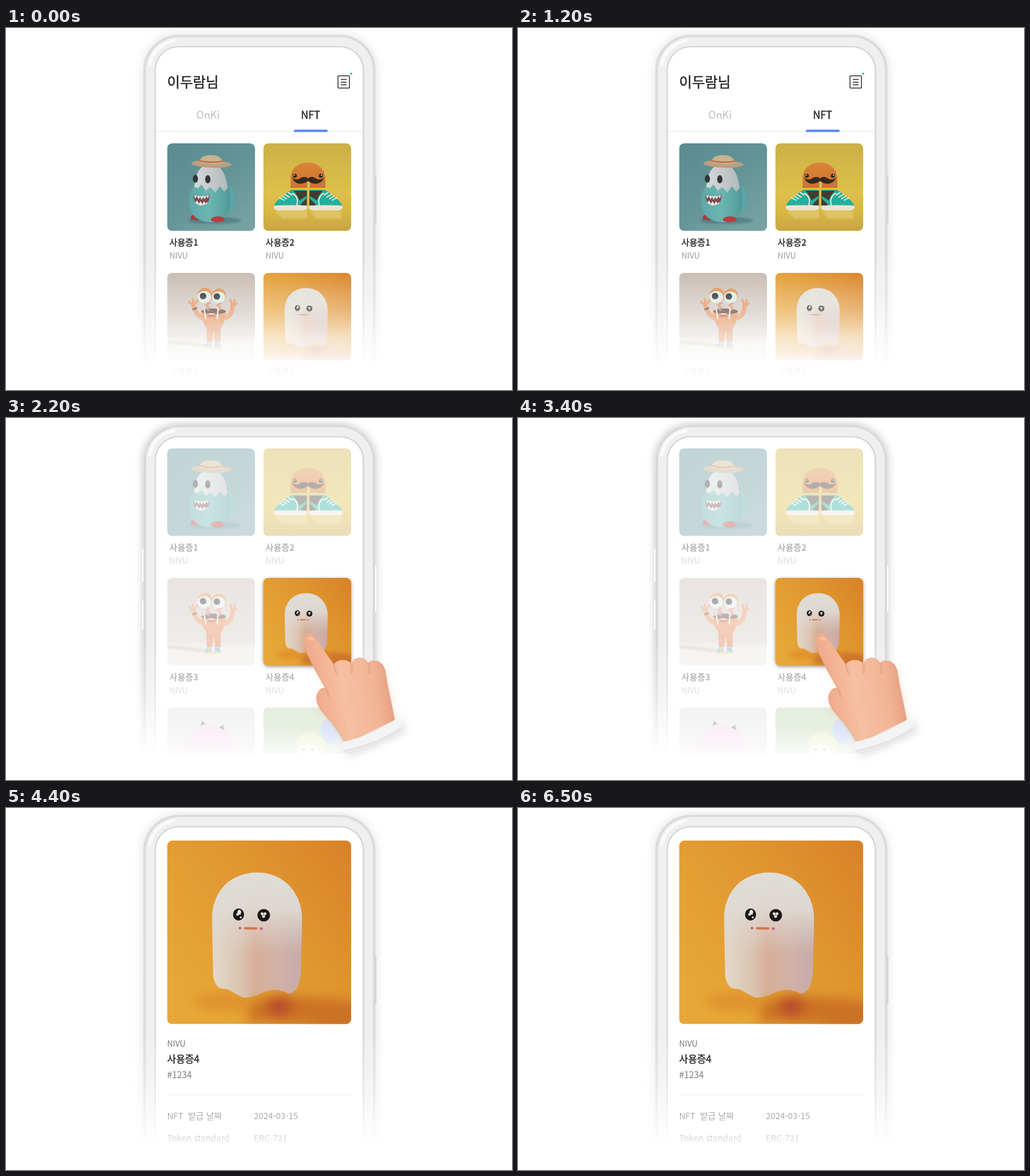
Recreate the animation shown at these times as an HTML page. Size 884 px wide and 634 px high, loop 7.9 s.

```html
<!DOCTYPE html>
<html lang="ko">
<head>
<meta charset="utf-8">
<title>NFT wallet</title>
<style>
  html, body { margin: 0; width: 100%; height: 100%; overflow: hidden; background: #fff; }
  svg { display: block; width: 100%; height: 100%; }
  text { font-family: "Noto Sans CJK KR", "Noto Sans KR", "Noto Sans CJK JP", "Noto Sans", sans-serif; white-space: pre; }
  .strong { fill: #222; stroke: #222; stroke-width: .4px; }
  .name { font-size: 15.1px; }
  .org { font-size: 14px; fill: #999; }
  .row { font-size: 15px; fill: #888; }
  .card { clip-path: url(#round); }
  .home { animation: home 7.9s step-end infinite; }
  .detail { opacity: 0; animation: detail 7.9s step-end infinite; }
  @keyframes home { 0% { opacity: 1 } 25.316% { opacity: .55 } 27.848% { opacity: 0 } 100% { opacity: 0 } }
  @keyframes detail { 0% { opacity: 0 } 53.164% { opacity: .5 } 55.696% { opacity: 1 } 100% { opacity: 1 } }
</style>
</head>
<body>
<svg viewBox="0 0 884 634" preserveAspectRatio="none">
<defs>
  <clipPath id="round"><rect width="100" height="100" rx="5.8"/></clipPath>
  <clipPath id="roundBig"><rect width="100" height="100" rx="2.8"/></clipPath>
  <clipPath id="fold"><rect width="884" height="588"/></clipPath>
  <filter id="halo" x="-20%" y="-20%" width="140%" height="140%"><feGaussianBlur stdDeviation="9"/></filter>
  <filter id="soft" x="-50%" y="-50%" width="200%" height="200%"><feGaussianBlur stdDeviation="3"/></filter>
  <filter id="fine" x="-50%" y="-50%" width="200%" height="200%"><feGaussianBlur stdDeviation="1.2"/></filter>

  <linearGradient id="fadeFrame" gradientUnits="userSpaceOnUse" x1="0" y1="390" x2="0" y2="590">
    <stop stop-color="#fff" stop-opacity="0"/><stop offset=".5" stop-color="#fff" stop-opacity=".4"/><stop offset="1" stop-color="#fff"/>
  </linearGradient>
  <linearGradient id="fadeHome" gradientUnits="userSpaceOnUse" x1="0" y1="420" x2="0" y2="610">
    <stop stop-color="#fff" stop-opacity="0"/><stop offset=".42" stop-color="#fff" stop-opacity=".4"/>
    <stop offset=".63" stop-color="#fff" stop-opacity=".7"/><stop offset=".84" stop-color="#fff" stop-opacity=".9"/><stop offset="1" stop-color="#fff"/>
  </linearGradient>
  <linearGradient id="fadeDetail" gradientUnits="userSpaceOnUse" x1="0" y1="430" x2="0" y2="590">
    <stop stop-color="#fff" stop-opacity="0"/><stop offset=".69" stop-color="#fff" stop-opacity=".3"/>
    <stop offset=".92" stop-color="#fff" stop-opacity=".65"/><stop offset="1" stop-color="#fff" stop-opacity=".85"/>
  </linearGradient>

  <linearGradient id="tealBg" x1="0" y1="0" x2=".7" y2="1"><stop stop-color="#598b91"/><stop offset=".6" stop-color="#659599"/><stop offset="1" stop-color="#76a0a4"/></linearGradient>
  <linearGradient id="tealSkin" x1="0" x2="1"><stop stop-color="#5ca7a5"/><stop offset=".5" stop-color="#6cb6b2"/><stop offset="1" stop-color="#4f989a"/></linearGradient>
  <linearGradient id="shell" x1="0" x2="1"><stop stop-color="#d6d8d9"/><stop offset="1" stop-color="#b3b9bb"/></linearGradient>
  <linearGradient id="yellowBg" x1="0" y1="0" x2="0" y2="1"><stop stop-color="#cdb046"/><stop offset=".55" stop-color="#dcc04b"/><stop offset=".75" stop-color="#d9b843"/><stop offset="1" stop-color="#c9a544"/></linearGradient>
  <linearGradient id="orangeSkin" x1="0" y1="0" x2="0" y2="1"><stop stop-color="#da8439"/><stop offset="1" stop-color="#c8712a"/></linearGradient>
  <linearGradient id="greyBg" x1="0" y1="0" x2="0" y2="1"><stop stop-color="#c6bab0"/><stop offset=".72" stop-color="#d4cbc3"/><stop offset=".8" stop-color="#e8e3dc"/><stop offset="1" stop-color="#eae5df"/></linearGradient>
  <linearGradient id="amberBg" x1="0" y1=".7" x2="1" y2="0"><stop stop-color="#e7a738"/><stop offset=".55" stop-color="#e09630"/><stop offset="1" stop-color="#d88127"/></linearGradient>
  <linearGradient id="ghostSkin" x1="0" x2="1"><stop stop-color="#e2d9c9"/><stop offset=".3" stop-color="#dbc5b3"/><stop offset=".48" stop-color="#d6ae96"/><stop offset=".72" stop-color="#d2b2a6"/><stop offset="1" stop-color="#c7aaa8"/></linearGradient>
  <linearGradient id="ghostTop" x1="0" y1="0" x2="0" y2="1"><stop stop-color="#e0ded7"/><stop offset=".3" stop-color="#dedbd5" stop-opacity=".9"/><stop offset=".65" stop-color="#dcd5ce" stop-opacity="0"/></linearGradient>
  <linearGradient id="skin" gradientUnits="userSpaceOnUse" x1="545" y1="490" x2="675" y2="470"><stop stop-color="#f0ad8d"/><stop offset=".35" stop-color="#f6c0a2"/><stop offset=".75" stop-color="#f1b595"/><stop offset="1" stop-color="#e4a081"/></linearGradient>

  <g id="egg">
    <rect width="100" height="100" fill="url(#tealBg)"/>
    <ellipse cx="54" cy="88" rx="30" ry="4" fill="#2f626a" opacity=".4" filter="url(#fine)"/>
    <ellipse cx="33.5" cy="84.5" rx="7" ry="3.5" fill="#a93c3f"/>
    <ellipse cx="72" cy="63" rx="5" ry="15" fill="#5aa5a5" transform="rotate(-8 72 63)"/>
    <path d="M30 50C26 56 24 60 25 66C24 78 32 90 50 90C65 90 72 81 72 68C72 48 66 25 50 24C36 24 32 40 30 50Z" fill="url(#tealSkin)"/>
    <ellipse cx="57.7" cy="86.7" rx="8" ry="3.4" fill="#b23f41"/>
    <path d="M31 50C32 36 36 24 50 24C63 24 67 38 69 51L65 55L60 49L55 56L49 50L44 54L39 47L35 51Z" fill="url(#shell)"/>
    <path d="M30 58C36 62 42 61 48 58C49 65 46 70 40 70C33 71 30 66 30 58Z" fill="#7d4b4e"/>
    <path d="M30.500 59l1.600 4 1.800-3 1.800 4 1.800-3 1.800 3.500 1.800-3.500 1.800 3 1.800-4 1.800 3 1-4Q39 62 30.500 59ZM32 68l2-3 2 4 2-3 2 3.500 2-3.500 2 3 1.500-2.500V69L38 71Z" fill="#eee"/>
    <ellipse cx="32.2" cy="40.4" rx="2.9" ry="4.5" fill="#30363a"/><ellipse cx="46.300" cy="41" rx="3" ry="4.600" fill="#30363a"/>
    <ellipse cx="50.5" cy="23.500" rx="23" ry="4.300" fill="#b6a17d" transform="rotate(2 50 23)"/>
    <path d="M36 22C38 15 43 13.500 50 13.500C58 13.500 62 16 64 23Q50 26 36 22Z" fill="#c7b48f"/>
    <path d="M36.500 20Q50 23 63.500 20.500" fill="none" stroke="#d15d4e" stroke-width="1.500"/>
  </g>

  <g id="shoe">
    <path d="M12 72C13 66 20 63 26 57L32 53H49.500V74H12Z" fill="#25ae9c"/>
    <path d="M34 54H49.500V72H43C42 65 39 59 34 54Z" fill="#443b32"/>
    <path d="M40 66L49 60V63L42 70Z" fill="#25ae9c"/>
    <path d="M12 71Q30 70 50 71V74Q49 76.500 44 76.500H17Q11 76.500 12 71Z" fill="#ece5ce"/>
    <path d="M18 62l6 3M21 60l6 3.500M24 58l6 3.500M28 56l5 3M33 57Q41 61 38 71" fill="none" stroke="#f1ead4" stroke-width="1.300"/>
  </g>
  <g id="boots">
    <rect width="100" height="100" fill="url(#yellowBg)"/>
    <g opacity=".35" filter="url(#fine)"><path d="M13 77H50V86H22ZM53 77H89V86H60Z" fill="#f0e3a4"/></g>
    <path d="M31 57V41C31 28 40 22 50.800 22C62 22 70.700 29 70.700 41V57H53V44Q51.500 39 50 44V57Z" fill="url(#orangeSkin)"/>
    <path d="M30.500 51H50V55H30.500ZM53 51H71V55H53Z" fill="#e9c93c"/>
    <use href="#shoe"/><use href="#shoe" transform="translate(102 0) scale(-1 1)"/>
    <path d="M51 40C46 36 42 40 40 41Q36 42 33 39C35 47 44 48 51 43C57 48 67 47 69 39Q66 42 62 41C59 40 56 36 51 40Z" fill="#37291f"/>
    <g fill="#2c2723"><circle cx="36" cy="37" r="2.300"/><circle cx="65.500" cy="37" r="2.300"/></g>
    <g fill="#eee"><circle cx="35.300" cy="36.300" r=".7"/><circle cx="66.200" cy="36.300" r=".7"/></g>
  </g>

  <g id="pot">
    <rect width="100" height="100" fill="url(#greyBg)"/>
    <path d="M0 78Q25 77 55 84V87Q20 82 0 81Z" fill="#a89b90" opacity=".55" filter="url(#fine)"/>
    <g fill="none" stroke="#e18b55" stroke-linecap="round">
      <path d="M41 52Q33 49 30 38M65 52Q74 50 74.500 37" stroke-width="5"/>
      <path d="M29 37l-4-4M30 36l-1-6M31 36l4-5M74 37l-2-6M75 36l2-5M76 37l3-2" stroke-width="2.400"/>
    </g>
    <path d="M29 42l5-2" stroke="#4b3831" stroke-width="2"/>
    <path d="M44.500 60H61V79H54.300L53.300 65L51.500 79H45Z" fill="#d97641"/>
    <path d="M38.800 44H66.800Q66 57 61 63H45Q39.500 57 38.800 44Z" fill="#df8149"/>
    <ellipse cx="52.800" cy="44" rx="14" ry="3.300" fill="#4c382c"/>
    <path d="M44 33l4 2-4 2 4 2-4 2 4 2M57 33l4 2-4 2 4 2-4 2 4 2" fill="none" stroke="#d6785c" stroke-width="1.500"/>
    <path d="M42 40L44 53M58 40L57 53" stroke="#f0e7d8" stroke-width="1.600"/>
    <path d="M46 46h9l-1 4h-7Z" fill="#b5412e"/><path d="M47 46.500h7v1.300h-7Z" fill="#f1e7d8"/>
    <g fill="#e08b4e"><circle cx="43.300" cy="25.400" r="8.400"/><circle cx="59" cy="26" r="8"/></g>
    <g fill="#dcebe5"><ellipse cx="42.300" cy="27.600" rx="7.700" ry="6.800"/><ellipse cx="58.500" cy="28" rx="7.500" ry="6.600"/></g>
    <g fill="#1f2326"><circle cx="40.900" cy="26.500" r="3.700"/><circle cx="56.600" cy="27" r="3.700"/></g>
    <path d="M43 85.500Q42 81 46 79.500H50.500V86H43ZM54 79.500H59Q62 82 61 86H54Z" fill="#6fa9d2"/>
    <path d="M43 84h7.500v2H43ZM54 84h7v2h-7ZM46 80h3v2h-3Z" fill="#e6c552"/>
  </g>

  <path id="ghostBody" d="M24.400 43C24.400 27 35 17.400 48.900 17.400C63 17.400 73.300 28 73.300 43L72.700 72.500C72 80 69 83.500 66 83.300C63 82 60 80.800 57 81.300C52 82 47 86 41.600 85.500C37 84 34 80.500 30.700 80.700C27 81 25.300 77 25 72.500Z"/>
  <g id="ghost">
    <rect width="100" height="100" fill="url(#amberBg)"/>
    <path d="M44 88Q60 82 104 88V104H92Q70 98 44 99Z" fill="#bf5f1d" opacity=".65" filter="url(#soft)"/>
    <ellipse cx="30" cy="88" rx="16" ry="4" fill="#d98226" opacity=".6" filter="url(#soft)"/>
    <ellipse cx="61" cy="90.500" rx="7" ry="5" fill="#b44032" opacity=".75" filter="url(#soft)"/>
    <use href="#ghostBody" fill="url(#ghostSkin)"/><use href="#ghostBody" fill="url(#ghostTop)"/>
    <ellipse cx="38.800" cy="40.300" rx="3" ry="3.300" fill="#1d1917"/><ellipse cx="52.500" cy="40.700" rx="3.400" ry="3.400" fill="#1d1917"/>
    <g fill="#f2eeea"><ellipse cx="39.200" cy="39.100" rx="1" ry="1.300"/><circle cx="38.200" cy="40.300" r=".7"/><circle cx="40" cy="41.900" r=".5"/>
      <circle cx="51.600" cy="39.900" r=".75"/><circle cx="53.200" cy="39.900" r=".75"/><circle cx="52.400" cy="41.300" r=".8"/></g>
    <path d="M42.300 47.800L48.500 47.900" stroke="#d0794f" stroke-width="1.300" stroke-linecap="round"/>
    <g fill="#d2587a"><circle cx="39.600" cy="47.700" r=".75"/><circle cx="51.200" cy="48" r=".75"/></g>
  </g>

  <g id="cat">
    <rect width="100" height="100" fill="#d9d9db"/>
    <path d="M35 28L40 15L49 25ZM55 25L64 20L66 32Z" fill="#4d474b"/>
    <path d="M10 45Q20 42 27 36C31 20 44 16 52 22C64 22 72 31 74 41Q80 46 82 54H14Z" fill="#efbfdf"/>
  </g>
  <g id="helmet">
    <rect width="100" height="100" fill="#a8c493"/>
    <circle cx="80" cy="26" r="15" fill="#7c9fe0"/>
    <ellipse cx="53" cy="43" rx="17" ry="14" fill="#d5e08b"/>
    <ellipse cx="51" cy="50" rx="13" ry="8" fill="#f0f2dd"/>
    <circle cx="46" cy="48" r="3.500" fill="#fff"/><circle cx="56" cy="48" r="3.500" fill="#fff"/>
    <circle cx="46" cy="48" r="1.500" fill="#555"/><circle cx="56" cy="48" r="1.500" fill="#555"/>
  </g>

  <g id="list">
    <use href="#egg" class="card" transform="translate(281.500 202) scale(1.535)"/>
    <use href="#boots" class="card" transform="translate(449.500 202) scale(1.535)"/>
    <use href="#pot" class="card" transform="translate(281.500 428.700) scale(1.535)"/>
    <use href="#ghost" class="card" transform="translate(449.500 428.700) scale(1.535)"/>
    <use href="#cat" class="card" transform="translate(281.500 655.500) scale(1.535)"/>
    <use href="#helmet" class="card" transform="translate(449.500 655.500) scale(1.535)"/>
    <g class="strong name"><text x="285.500" y="381">사용증1</text><text x="453.500" y="381">사용증2</text><text x="285.500" y="607.700">사용증3</text><text x="453.500" y="607.700">사용증4</text></g>
    <g class="org"><text x="285.500" y="404">NIVU</text><text x="453.500" y="404">NIVU</text><text x="285.500" y="631">NIVU</text><text x="453.500" y="631">NIVU</text></g>
  </g>

  <g id="shell-frame">
    <rect x="244.500" y="16" width="396.500" height="700" rx="58" fill="#efefef"/>
    <path d="M251 66C254 44 268 28 294 22" fill="none" stroke="#fff" stroke-width="5" stroke-linecap="round" opacity=".8" filter="url(#fine)"/>
    <rect x="259.500" y="31.500" width="366.500" height="700" rx="42" fill="#d8d8d8"/>
    <rect x="262" y="34" width="361" height="700" rx="39.500" fill="#fff"/>
  </g>
  <g id="phone" clip-path="url(#fold)">
    <rect x="240" y="12" width="405.500" height="720" rx="62" opacity=".13" filter="url(#halo)"/>
    <path d="M646 258V342" stroke="#d0d0d0" stroke-width="2"/>
    <rect x="240" y="12" width="405.500" height="720" rx="62" fill="#dbdbdb"/>
    <use href="#shell-frame"/>
    <path d="M239 229V290M239 320V374" stroke="#f6f6f6" stroke-width="1.500"/>
    <rect y="390" width="884" height="244" fill="url(#fadeFrame)"/>
  </g>
</defs>

<!-- picking a card -->
<g>
  <rect width="884" height="634" fill="#fff"/>
  <g clip-path="url(#fold)">
    <rect x="242" y="14" width="401" height="720" rx="60" opacity=".3" filter="url(#halo)"/>
    <use href="#shell-frame"/>
    <path d="M239 229V287M239 320V370M646 258V340" stroke="#fff" stroke-width="2"/>
    <rect y="390" width="884" height="244" fill="url(#fadeFrame)"/>
    <use href="#list" y="-148.700" opacity=".38"/>
    <rect x="263" y="430" width="359" height="204" fill="url(#fadeDetail)"/>
  </g>
  <rect x="449.500" y="282" width="153.500" height="153.500" rx="9" opacity=".4" filter="url(#soft)"/>
  <use href="#ghost" class="card" transform="translate(449.500 280) scale(1.535)"/>
  <g opacity=".2" filter="url(#halo)" transform="translate(4 5)">
    <use href="#hand"/><path d="M588 568L686 525L691 543L594 585Z"/>
  </g>
  <path id="hand" d="M519 393C516 379 532 374 540 385L573 432C576 424 593 419 603 430C606 418 625 415 633 429C639 421 658 424 662 440C665 466 674 500 679 529L593 571C584 552 572 536 560 523C547 510 539 495 544 482C547 474 554 471 558 473C548 455 522 412 519 393Z" fill="url(#skin)"/>
  <g fill="none" stroke="#dc9070" stroke-linecap="round">
    <path d="M573 432Q574 442 579 449M603 430Q605 438 604 447M633 429Q636 438 635 447M558 473Q563 480 563 489" stroke-width="2.500" opacity=".6" filter="url(#fine)"/>
    <path d="M520 395C524 412 548 455 558 473M662 440C665 466 674 500 678 528M544 484C540 495 548 511 560 523C572 536 583 552 591 568" stroke-width="2" opacity=".45" filter="url(#fine)"/>
  </g>
  <path d="M527 388Q532 382 537 389" fill="none" stroke="#fbd8c4" stroke-width="3" opacity=".7" filter="url(#fine)"/>
  <path d="M590 567Q642 556 683 526Q689 525 691 543Q646 576 596 585Q588 582 588 570Z" fill="#f4f4f6"/>
  <path d="M592 583Q646 573 690 543" fill="none" stroke="#d9d9df" stroke-width="2.500" filter="url(#fine)"/>
</g>

<!-- home list -->
<g class="home">
  <rect width="884" height="634" fill="#fff"/>
  <use href="#phone"/>
  <use href="#list"/>
  <rect x="263" y="420" width="359" height="214" fill="url(#fadeHome)"/>
  <text class="strong" x="281.500" y="104" font-size="24.500">이두람님</text>
  <g fill="none" stroke="#2b2b2b" stroke-width="1.500"><rect x="580" y="83.700" width="20" height="21.500" rx="1.500"/><path d="M585 90H595M585 94.700H595M585 99.500H595"/></g>
  <circle cx="603" cy="80" r="2" fill="#2fcbc3"/>
  <g font-size="18" text-anchor="middle"><text x="353" y="159" fill="#bdbdbd">OnKi</text><text class="strong" x="532" y="159">NFT</text></g>
  <path d="M262 181.500H623" stroke="#dedede"/>
  <rect x="503" y="178" width="59" height="4.300" rx="2" fill="#5a8df0"/>
</g>

<!-- card detail -->
<g class="detail">
  <rect width="884" height="634" fill="#fff"/>
  <use href="#phone"/>
  <use href="#ghost" clip-path="url(#roundBig)" transform="translate(281.500 57) scale(3.215)"/>
  <text class="org" x="281.500" y="418" style="fill:#777">NIVU</text>
  <text class="strong" x="281.500" y="446" font-size="17">사용증4</text>
  <text x="281.500" y="473" font-size="15.500" fill="#888" stroke="#888" stroke-width=".3">#1234</text>
  <path d="M282 502.500H603" stroke="#e4e4e4"/>
  <g class="row" clip-path="url(#fold)">
    <text x="281.500" y="545">NFT  발급 날짜</text><text x="433" y="545">2024-03-15</text>
    <text x="281.500" y="584">Token standard</text><text x="433" y="584">ERC-721</text>
  </g>
  <rect x="263" y="430" width="359" height="160" fill="url(#fadeDetail)"/>
</g>
</svg>
</body>
</html>
```
